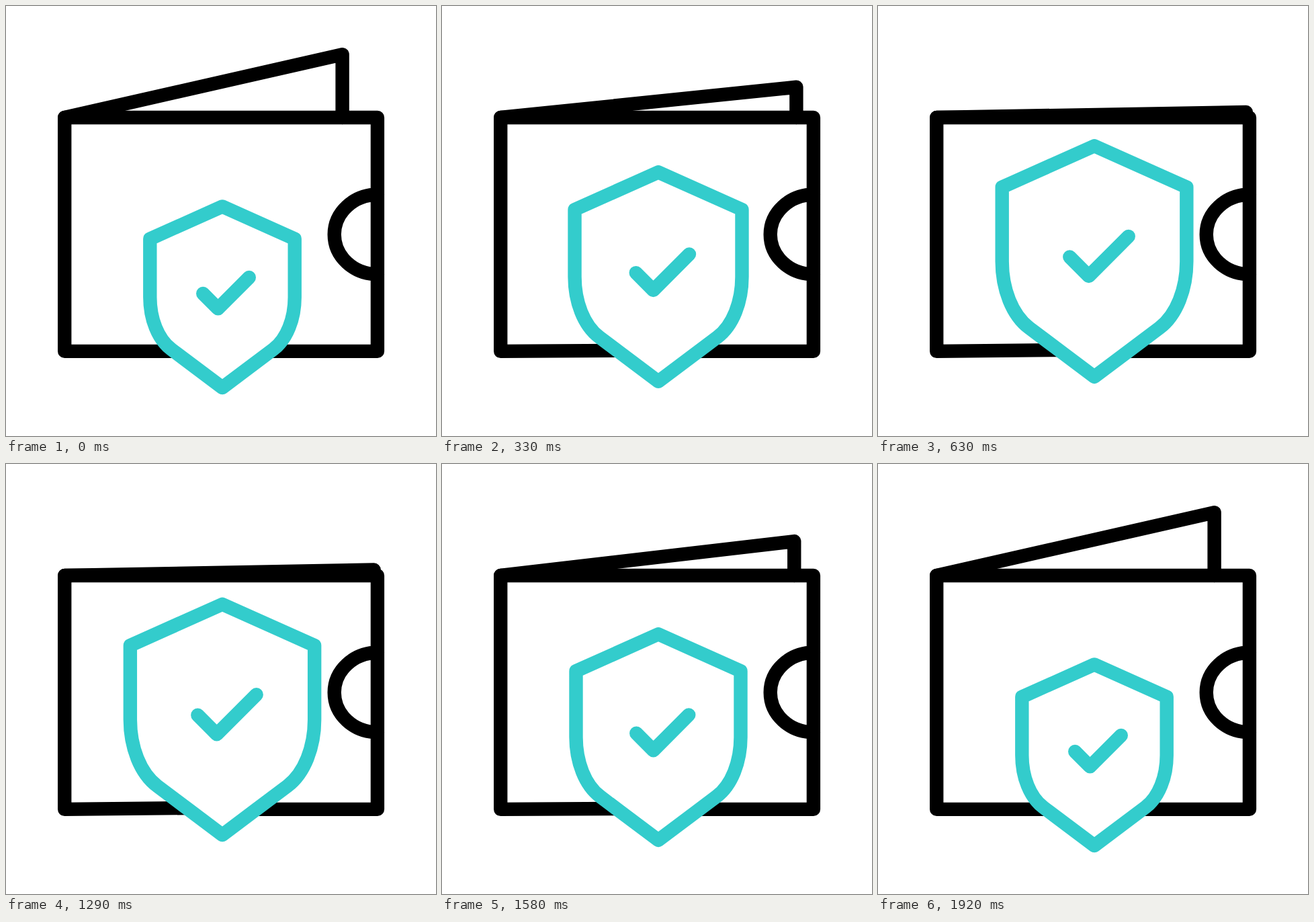
Write an HTML page that moves like this. It is 640 px wide and 640 px high and loops after 2040 ms.

```html
<!DOCTYPE html>
<html lang="en">
<head>
<meta charset="utf-8">
<title>Secure wallet</title>
<style>
  html, body { margin: 0; width: 100%; height: 100%; overflow: hidden; background: #fff; }
  svg { display: block; width: 100%; height: 100%; }
  path { fill: none; stroke: #000; stroke-width: 20.4; stroke-linecap: round; stroke-linejoin: round; }
  .teal { stroke: #3cc; }
  #shield { fill: #fff; }
</style>
</head>
<body>
<svg viewBox="0 0 640 640">
  <path id="flap"/>
  <path id="wallet"/>
  <path d="M552.9 280.8A64.2 59.3 0 0 0 552.9 399.4"/>
  <path id="shield" class="teal"/>
  <path id="check" class="teal"/>
</svg>
<script>
const LOOP = 2040, FPS = 24;
const [flap, wallet, shield, check] =
  ["flap", "wallet", "shield", "check"].map(id => document.getElementById(id));

// Points are relative to the shield's top corner.
const SHIELD = [
  ["M", 0, 0], ["L", 107.7, 48.2], ["L", 107.7, 135],
  ["C", 107.7, 167, 96, 197.5, 76, 212.5], ["L", 0, 269.6],
  ["L", -76, 212.5], ["C", -96, 197.5, -107.7, 167, -107.7, 135],
  ["L", -107.7, 48.2], ["Z"]
];
const CHECK = [["M", -28.8, 129.6], ["L", -6.5, 152], ["L", 39.8, 105.6]];

const lerp = (a, b, p) => a + (b - a) * p;
const clamp = v => Math.min(1, Math.max(0, v));

// cubic-bezier(.5, 0, .5, 1)
function ease(x) {
  let lo = 0, hi = 1;
  for (let i = 0; i < 30; i++) {
    const s = (lo + hi) / 2;
    if (1.5 * s * (1 - s) + s ** 3 < x) lo = s; else hi = s;
  }
  return lo * lo * (3 - 2 * lo);
}

// Scales points only, so the line weight stays constant.
function place(parts, y, scale) {
  return parts.map(([cmd, ...n]) =>
    cmd + n.map((v, i) => (v * scale + (i % 2 ? y : 322)).toFixed(2)).join(" ")).join("");
}

function draw(ms) {
  const t = Math.floor((ms % LOOP) / 10) * 10;
  const step = Math.floor((t + 4.9) * FPS / 1000);
  const p = ease(clamp(step / 15)) - ease(clamp((step - 30) / 16));

  const tipX = lerp(500.6, 547.9, p), tipY = lerp(72.1, 158, p);
  flap.setAttribute("d", `M87.2 166L${tipX} ${tipY}V166`);
  wallet.setAttribute("d", `M270 ${513.9 - 1.9 * p}L87.2 513.9V166H552.9V513.9H373`);

  const y = lerp(298.4, 208.2, p), scale = lerp(1, 1.275, p);
  shield.setAttribute("d", place(SHIELD, y, scale));
  check.setAttribute("d", place(CHECK, y, scale));
}

const start = performance.now();
function tick(now) {
  draw(Math.max(0, now - start));
  requestAnimationFrame(tick);
}
draw(0);
requestAnimationFrame(tick);
</script>
</body>
</html>
```
